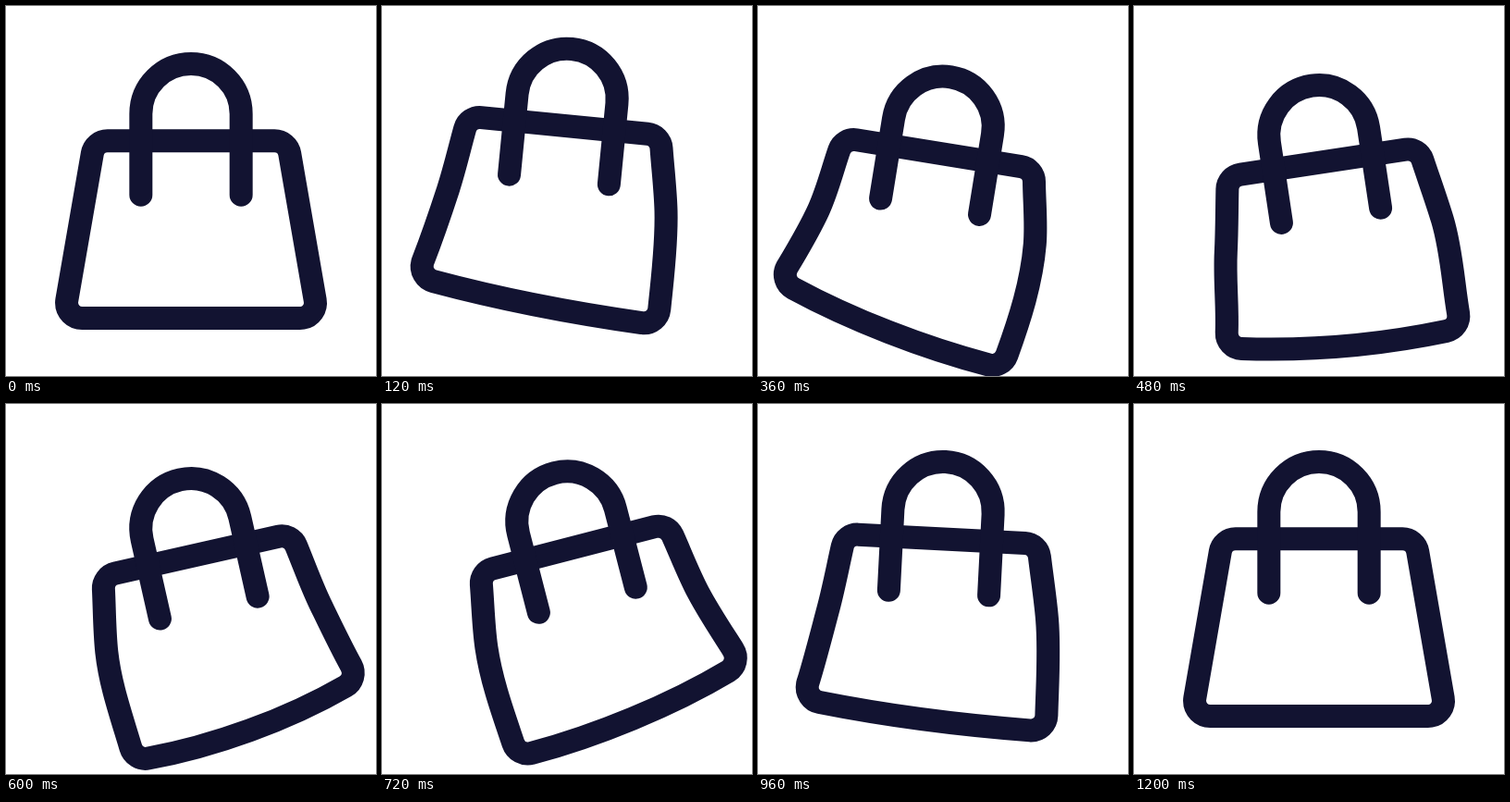
An HTML page with a canvas that plays this animation: 400 px wide and 400 px high, repeating every 3230 ms.

```html
<!DOCTYPE html>
<html lang="en">
<head>
<meta charset="utf-8">
<title>Swinging bag</title>
<style>
  html, body { margin: 0; width: 100%; height: 100%; overflow: hidden; background: #fff; }
  canvas { display: block; }
</style>
</head>
<body>
<canvas id="stage" width="400" height="400"></canvas>
<script>
const ctx = document.getElementById('stage').getContext('2d');
const LOOP = 3230, STEP = 30;
const { PI, atan, cos, sin, min, hypot } = Math;

// Ease in and out from one [time, value] pose to the next, starting at rest.
const swing = (...poses) => t => {
  let from = [0, 0];
  for (const to of poses) {
    if (t < to[0]) {
      const p = (t - from[0]) / (to[0] - from[0]);
      return from[1] + (to[1] - from[1]) * p * p * (3 - 2 * p);
    }
    from = to;
  }
  return from[1];
};

const lift = swing([193, -24], [430, 23.7], [965, 0]);
const tilt = swing([288, 14.9], [525, -11], [690, -15], [980, 3.2], [1150, 0]);
const sway = swing([250, 1], [340, 1], [660, -0.75], [1050, 0.56], [1200, 0]);
const bulge = swing([240, 1], [480, 1], [900, 0.5], [1080, 0.5], [1200, 0]);

// Body measures, relative to the centre of the handle's arc
const R = 16.67, SLANT = 0.1736, TOP_X = 90.3, TOP_Y = 45.83, MID_Y = 110;
const slantX = y => 106.7 + SLANT * (y - 43);
const along = ([x, y], slope, d) => [x + slope * d, y + d];

// One side of the body (-1 left, 1 right), swayed by m and bulged by q.
function side(s, m, q) {
  const right = min(m, 0);
  const x = s * (117.8 - 9 * q) - 18 * m;
  const y = 204.2 + 24 * s * m + 2 * q + 8 * right;
  const k = s * (SLANT - 0.07 * q) - 0.3 * m;
  const b = 0.22 * m - s * q * (0.12 - 0.12 * right);
  const h = hypot(1, k), midSlope = s * SLANT - 0.1 * m;
  const top = [s * slantX(43), 43], mid = [s * slantX(MID_Y), MID_Y];
  const end = [x + s * R / h, y - s * k * R / h];
  const len = (end[1] - MID_Y) / 3;
  return {
    x, y, b,
    wall: s > 0 ? -atan(k) : PI - atan(k),
    floor: [x - R * sin(b), y + R * cos(b)],
    points: [top, along(top, s * SLANT, 22), along(mid, midSlope, -22), mid,
      along(mid, midSlope, len), along(end, k, -len), end]
  };
}

function trace(p) {
  ctx.bezierCurveTo(...p[1], ...p[2], ...p[3]);
  ctx.bezierCurveTo(...p[4], ...p[5], ...p[6]);
}

function body(m, q) {
  const l = side(-1, m, q), r = side(1, m, q), a = atan(SLANT), d = 72;
  ctx.beginPath();
  ctx.arc(-TOP_X, TOP_Y, R, PI + a, PI * 1.5);
  ctx.arc(TOP_X, TOP_Y, R, -PI / 2, -a);
  trace(r.points);
  ctx.arc(r.x, r.y, R, r.wall, PI / 2 + r.b);
  ctx.bezierCurveTo(
    r.floor[0] - d * cos(r.b), r.floor[1] - d * sin(r.b),
    l.floor[0] + d * cos(l.b), l.floor[1] + d * sin(l.b), ...l.floor);
  ctx.arc(l.x, l.y, R, PI / 2 + l.b, l.wall);
  trace(l.points.reverse());
  ctx.closePath();
  ctx.stroke();
}

function handle() {
  ctx.beginPath();
  ctx.moveTo(-54.17, 87.5);
  ctx.arc(0, 0, 54.17, PI, 0);
  ctx.lineTo(54.17, 87.5);
  ctx.stroke();
}

function draw(now) {
  const t = Math.floor(now % LOOP / STEP) * STEP;
  ctx.setTransform(1, 0, 0, 1, 0, 0);
  ctx.fillStyle = '#fff';
  ctx.fillRect(0, 0, 400, 400);
  ctx.translate(200, 116.67 + lift(t));
  ctx.rotate(tilt(t) * PI / 180);
  ctx.strokeStyle = '#121331';
  ctx.lineWidth = 25;
  ctx.lineCap = ctx.lineJoin = 'round';
  body(sway(t), bulge(t));
  handle();
  requestAnimationFrame(draw);
}
requestAnimationFrame(draw);
</script>
</body>
</html>
```
